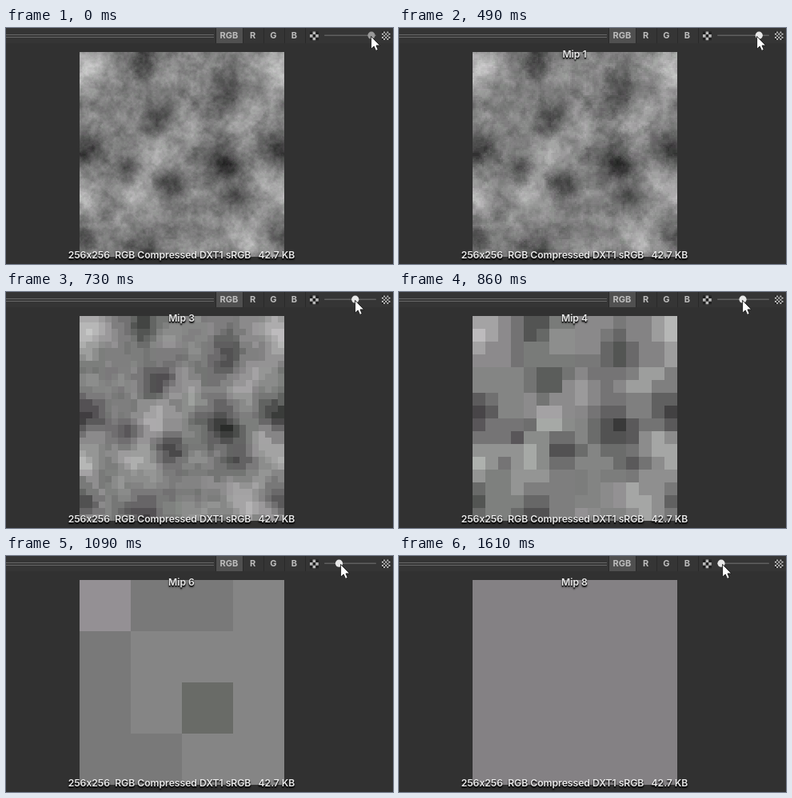
An HTML page with a canvas for the animation above (1710 ms loop, 484 by 295 pixels).

```html
<!DOCTYPE html>
<html lang="en">
<head>
<meta charset="utf-8">
<title>Mip preview</title>
<style>
  html, body { margin: 0; width: 100%; height: 100%; overflow: hidden; background: #313131; }
  #stage { position: absolute; left: 0; top: 0; width: 484px; height: 295px; overflow: hidden; background: #313131; }
  #tex { position: absolute; left: 92px; top: 30px; width: 256px; height: 256px; }
  svg { position: absolute; left: 0; top: 0; }
  text { font-family: Inter, "Liberation Sans", sans-serif; text-anchor: middle; white-space: pre; }
  .btn { font-size: 11px; font-weight: 700; fill: #bdbdbd; }
  .label { font-size: 12.15px; font-weight: 600; fill: #ececec; text-shadow: 0 1px 1px #000, 0 2px 2px #000; }
</style>
</head>
<body>
<div id="stage">
  <canvas id="tex" width="256" height="256"></canvas>
  <svg width="484" height="295" viewBox="0 0 484 295">
    <rect width="484" height="19" fill="#353535"/>
    <path d="M0 8.5H260M0 11.5H260" stroke="#686868"/>
    <rect x="263" width="33" height="19" fill="#505050"/>
    <g id="bar"></g>
    <rect x="398" y="8.5" width="65" height="1.5" rx=".7" fill="#606060"/>
    <circle id="knob" cy="9.2" r="4.6"/>
    <text class="label" id="mip" x="219.5" y="37"></text>
    <text class="label" x="219.5" y="288">256x256  RGB Compressed DXT1 sRGB   42.7 KB</text>
    <path id="cursor" d="M.6 .4V16.2L4.2 12.9L6.6 18.4L9.3 17.2L7 11.9H11.7Z" fill="#fff" stroke="#161616" stroke-width=".9"/>
  </svg>
</div>
<script>
const $ = id => document.getElementById(id);
const LOOP = 1710, SIZE = 256, PRESS = 120, STEP = 46, KNOB = 457, GAP = 6.75;

const mix = (a, b, t) => a + (b - a) * t;
const clamp = (v, lo, hi) => Math.max(lo, Math.min(hi, v));
const ease = t => t * t * (3 - 2 * t);

// Pointer path: time, x
const drag = [[250, 456], [490, 447], [910, 426], [1420, 404]];

function pointer(t) {
  const [t0, x0] = drag[0];
  if (t < 260) return x0;
  const q = 260 + Math.floor((t - 260) / STEP) * STEP;
  let x = x0;
  for (let i = 1; i < drag.length; i++) {
    const [a, from] = drag[i - 1], [b, to] = drag[i];
    if (q >= a) x = mix(from, to, clamp((q - a) / (b - a), 0, 1));
  }
  return Math.round(x);
}

// Main patches of the cloud: x, y, radius
const dark = [
  [12, 126, 15], [184, 50, 17], [95, 80, 13], [168, 132, 15], [188, 142, 12],
  [242, 118, 14], [194, 182, 14], [82, 240, 13], [57, 142, 11], [108, 165, 12],
  [2, 232, 14], [80, 14, 13]
];
const light = [
  [16, 14, 16], [244, 20, 18], [210, 78, 15], [104, 126, 16], [233, 168, 18],
  [8, 184, 13], [74, 176, 15], [208, 230, 17], [136, 92, 13]
];

function hash(x, y, s) {
  let h = Math.imul(x, 374761393) ^ Math.imul(y, 668265263) ^ Math.imul(s, 974711);
  h = Math.imul(h ^ (h >>> 13), 1274126177);
  return ((h ^ (h >>> 16)) >>> 0) / 2147483648 - 1;
}

function noise(x, y, cell) {
  const n = SIZE / cell, fx = x / cell, fy = y / cell;
  const ix = Math.floor(fx), iy = Math.floor(fy), u = ease(fx - ix), v = ease(fy - iy);
  const at = (i, j) => hash((ix + i) % n, (iy + j) % n, cell);
  return mix(mix(at(0, 0), at(1, 0), u), mix(at(0, 1), at(1, 1), u), v);
}

const wrap = d => d - SIZE * Math.round(d / SIZE);
const glow = (spots, x, y) => spots.reduce((sum, [sx, sy, r]) =>
  sum + Math.exp(-(wrap(x - sx) ** 2 + wrap(y - sy) ** 2) / (2 * r * r)), 0);

function cloud(x, y) {
  let v = 130 + 44 * glow(light, x, y) - 58 * glow(dark, x, y);
  for (let cell = 2; cell <= 16; cell *= 2) v += 4.5 * Math.sqrt(cell) * noise(x, y, cell);
  return v;
}

function half(src, n) {
  const m = n / 2, out = new Float32Array(m * m);
  for (let y = 0; y < m; y++) for (let x = 0; x < m; x++) {
    const i = 2 * y * n + 2 * x;
    out[y * m + x] = (src[i] + src[i + 1] + src[i + n] + src[i + n + 1]) / 4;
  }
  return out;
}

function makeCanvas(n) {
  const c = document.createElement("canvas");
  c.width = c.height = n;
  return c;
}

// Four shades per 4x4 block between two end colours of 5:6:5 bits
function compress(src, n) {
  const c = makeCanvas(n), g = c.getContext("2d"), img = g.createImageData(n, n);
  const snap = (v, k) => mix(v, Math.round(v * k / 255) * 255 / k, .6);
  for (let by = 0; by < n; by += 4) for (let bx = 0; bx < n; bx += 4) {
    const cells = Array.from({ length: 16 }, (_, k) => (by + (k >> 2)) * n + bx + (k & 3));
    const vals = cells.map(i => clamp(src[i], 28, 205));
    const lo = Math.min(...vals), hi = Math.max(...vals);
    cells.forEach((i, j) => {
      const t = Math.round((vals[j] - lo) / (hi - lo + .01) * 3) / 3;
      [31, 63, 31].forEach((k, ch) => img.data[i * 4 + ch] = mix(snap(lo, k), snap(hi, k), t));
      img.data[i * 4 + 3] = 255;
    });
  }
  g.putImageData(img, 0, 0);
  return c;
}

// Coarsest levels: a base colour with a few areas on it
function paint(n, base, ...areas) {
  const c = makeCanvas(n), g = c.getContext("2d");
  for (const [color, ...box] of [[base, 0, 0, n, n], ...areas]) {
    g.fillStyle = color;
    g.fillRect(...box);
  }
  return c;
}

const mips = [];
let field = new Float32Array(SIZE * SIZE).map((_, i) => cloud(i % SIZE, i >> 8));
for (let n = SIZE; n >= 8; n /= 2) {
  mips.push(compress(field, n));
  field = half(field, n);
}
mips.push(
  paint(4, "#797979", ["#858585", 3, 0, 1, 4], ["#858585", 1, 1, 2, 2], ["#858585", 2, 3, 1, 1],
    ["#949094", 0, 0, 1, 1], ["#696b67", 2, 2, 1, 1]),
  paint(2, "#848484", ["#7b7b7b", 0, 1, 1, 1]),
  paint(1, "#848184")
);

// Toolbar: channel buttons and the checkers at both ends of the slider
function checker(x, y, n, cell) {
  let d = "";
  for (let j = 0; j < n; j++) for (let i = 0; i < n; i++)
    if ((i + j) % 2) d += `M${x + i * cell} ${y + j * cell}h${cell}v${cell}h${-cell}z`;
  const w = n * cell;
  return `<rect x="${x}" y="${y}" width="${w}" height="${w}" fill="#1f1f1f"/><path d="${d}" fill="#b8b8b8"/>`;
}
const edge = x => `<path d="M${x} 0V19" stroke="#292929"/>`;
$("bar").innerHTML = edge(262.5) + edge(296.5) +
  `<text class="btn" x="278.8" y="13">RGB</text>` +
  [..."RGB"].map((c, i) => `<text class="btn" x="${308.5 + 26 * i}" y="13">${c}</text>` + edge(322.5 + 26 * i)).join("") +
  checker(380, 4.5, 3, 3.6) + checker(470, 4.5, 5, 2.1);

const view = $("tex").getContext("2d");
view.imageSmoothingEnabled = false;
let shown = -1;

function draw(t) {
  const x = pointer(t), mip = Math.round((KNOB - .5 - x) / GAP);
  $("cursor").setAttribute("transform", `translate(${x} 10)`);
  $("knob").setAttribute("fill", t < PRESS ? "#999" : "#e8e8e8");
  if (mip === shown) return;
  shown = mip;
  $("knob").setAttribute("cx", KNOB - mip * GAP);
  $("mip").textContent = mip ? "Mip " + mip : "";
  view.drawImage(mips[mip], 0, 0, SIZE, SIZE);
}

const start = performance.now();
function tick() {
  draw((performance.now() - start) % LOOP);
  requestAnimationFrame(tick);
}
draw(0);
requestAnimationFrame(tick);
</script>
</body>
</html>
```
